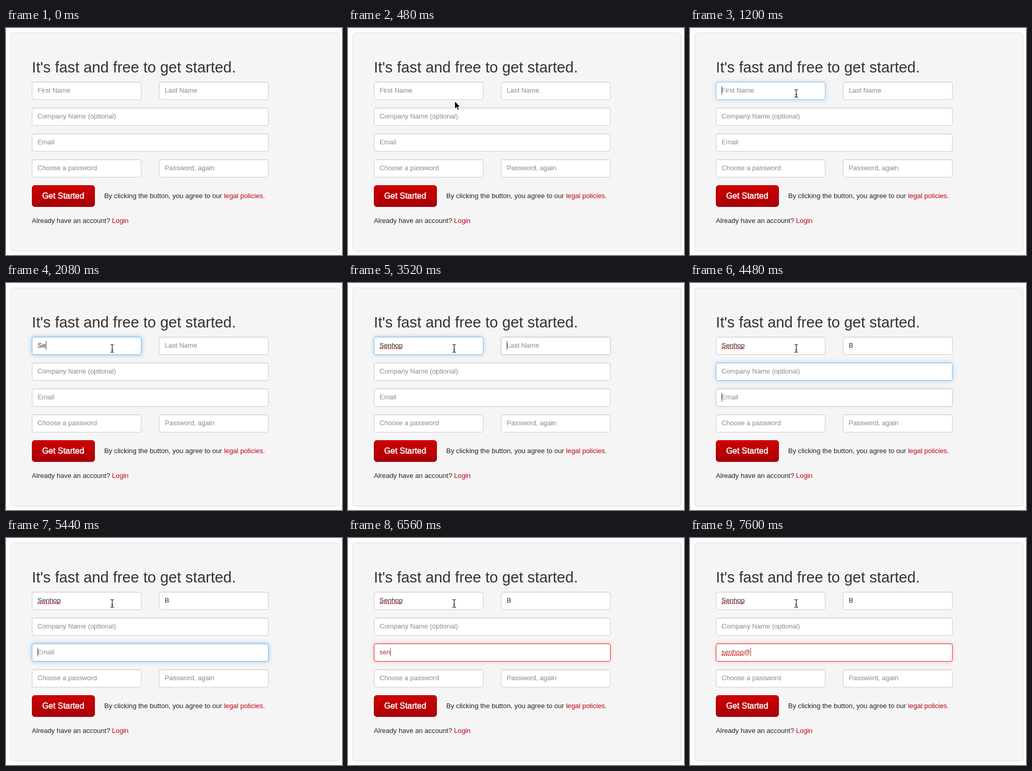
These frames come from a looping animation (650x439 px, 8 s). An HTML page:

```html
<!DOCTYPE html>
<html lang="en">
<head>
<meta charset="utf-8">
<title>Sign-up form</title>
<style>
html, body { margin: 0; width: 100%; height: 100%; overflow: hidden; background: #fff; }
body { position: relative; font-family: "Liberation Sans", Arial, sans-serif; }
svg { position: absolute; left: 0; top: 0; }
.field {
  position: absolute; box-sizing: border-box; height: 35px; padding-left: 10px;
  border: 1px solid #ccc; border-radius: 4px; background: #fff;
  font-size: 13px; line-height: 31px; white-space: pre; color: #444;
  -webkit-text-stroke: .2px;
}
.hint { color: #999; }
.typo {
  background: radial-gradient(circle at 1.5px 1.5px, #e8404a 1.1px, transparent 1.7px) 0 100% / 4px 3px repeat-x;
}
.caret {
  display: inline-block; width: 1px; height: 17px; margin-right: -1px;
  vertical-align: -4px; background: currentColor;
}
</style>
</head>
<body>
<svg width="650" height="439">
  <defs>
    <linearGradient id="red" x2="0" y2="1">
      <stop stop-color="#cf0000"/><stop offset="1" stop-color="#a6000a"/>
    </linearGradient>
  </defs>
  <rect x="9.5" y="9.5" width="635" height="422" rx="5" fill="#f5f5f5" stroke="#dcdcdc"/>
  <text x="50" y="86" font-size="29.3" fill="#333">It's fast and free to get started.</text>
  <rect x="50.5" y="304.5" width="121" height="41" rx="5" fill="url(#red)" stroke="#a80008"/>
  <g font-size="15.9" stroke-width=".5">
    <text x="70" y="329" fill="#800" opacity=".6">Get Started</text>
    <text x="70" y="330" fill="#fff" stroke="#fff">Get Started</text>
  </g>
  <g fill="#222">
    <text x="190" y="329" font-size="13.2">By clicking the button, you agree to our <tspan fill="#c00010">legal policies</tspan>.</text>
    <text x="50" y="377" font-size="13.1">Already have an account? <tspan fill="#c00010">Login</tspan></text>
  </g>
</svg>
<div id="form"></div>
<svg width="650" height="439">
  <g id="pointer">
    <g id="beam" fill="none" stroke-linecap="round">
      <path id="bar" d="M-3 -7.5Q0 -7.5 0 -5.5Q0 -7.5 3 -7.5M0 -5.5V6M-3 7.5Q0 7.5 0 5.5Q0 7.5 3 7.5M-1.5 2.5H1.5" stroke="#fff" stroke-width="3"/>
      <use href="#bar" style="display:none"/>
      <path d="M-3 -7.5Q0 -7.5 0 -5.5Q0 -7.5 3 -7.5M0 -5.5V6M-3 7.5Q0 7.5 0 5.5Q0 7.5 3 7.5M-1.5 2.5H1.5" stroke="#111" stroke-width="1.2"/>
    </g>
    <path id="arrow" d="M0 0V15L3.5 11.8L6 17.3L8.4 16.2L6 11H10.8Z" fill="#000" stroke="#fff"/>
  </g>
</svg>
<script>
const LOOP = 8000, STEP = 80, BLINK = 480;
const $ = id => document.getElementById(id);

// focus and blur: when the field becomes active and when it stops
const fields = [
  { x: 50, y: 104, w: 212, hint: 'First Name', focus: 1120, blur: 3520 },
  { x: 296, y: 104, w: 212, hint: 'Last Name', focus: 3520, blur: 4160 },
  { x: 50, y: 154, w: 458, hint: 'Company Name (optional)', focus: 4160, blur: 4480 },
  { x: 50, y: 204, w: 458, hint: 'Email', focus: 4480, blur: Infinity, invalid: 5680 },
  { x: 50, y: 254, w: 212, hint: 'Choose a password' },
  { x: 296, y: 254, w: 212, hint: 'Password, again' }
];

const keys = [];
function type(field, text, times) {
  times.forEach((time, i) => keys.push({ time, field, text: text.slice(0, i + 1) }));
}
type(0, 'Senhop', [1760, 2080, 2560, 2720, 2960, 3200]);
type(1, 'B', [3760]);
type(3, 'senhop@', [5680, 6320, 6560, 6800, 7040, 7360, 7600]);

for (const f of fields) {
  f.el = document.createElement('div');
  f.el.className = 'field';
  Object.assign(f.el.style, { left: f.x + 'px', top: f.y + 'px', width: f.w + 'px' });
  $('form').append(f.el);
}

const clamp = v => Math.max(0, Math.min(1, v));
const ramp = dt => dt < 0 ? 0 : clamp((dt + 40) / 200);
const mix = (a, b, k) => a.map((v, i) => v + (b[i] - v) * k);
const rgba = (c, alpha = 1) => `rgba(${c.map(Math.round)},${alpha})`;

const GREY = [204, 204, 204], BLUE = [117, 185, 240], RED = [236, 44, 44];
const BLUE_GLOW = [82, 168, 236], RED_GLOW = [243, 130, 126];

function drawField(f, index, t) {
  const typed = keys.filter(k => k.field === index && k.time <= t).pop();
  const text = typed ? typed.text : '';
  const active = t >= f.focus && t < f.blur;
  const level = f.focus ? ramp(t - f.focus) - ramp(t - f.blur) : 0;
  const bad = f.invalid ? ramp(t - f.invalid) : 0;

  const since = t - (typed ? typed.time : f.focus);
  const caret = active && Math.floor(since / BLINK) % 2 === 0 ? '<i class="caret"></i>' : '';
  const word = text.replace('@', '');
  const typo = word.length > 1 && (!active || word !== text);
  const html = text
    ? `<span class="${typo ? 'typo' : ''}">${word}</span>${text.slice(word.length)}${caret}`
    : `${caret}<span class="hint">${f.hint}</span>`;
  if (f.html !== html) f.el.innerHTML = f.html = html;

  const glow = rgba(mix(BLUE_GLOW, RED_GLOW, bad), .6 * level);
  f.el.style.color = bad ? '#b94a48' : '#444';
  f.el.style.borderColor = rgba(mix(GREY, mix(BLUE, RED, bad), level));
  f.el.style.boxShadow = `inset 0 1px 1px rgba(0,0,0,.075), 0 0 ${8 - 2 * bad}px ${glow}`;
}

function drawPointer(t) {
  const k = 1 - (1 - clamp(t / 640)) ** 2;
  const x = Math.round(228 - 23 * k), y = Math.round(372 - 246 * k);
  const overField = fields.some(f => x >= f.x && x < f.x + f.w && y >= f.y && y < f.y + 35);
  $('pointer').setAttribute('transform', `translate(${x + .5} ${y + .5})`);
  $('pointer').style.display = t ? '' : 'none';
  $('beam').style.display = overField ? '' : 'none';
  $('arrow').style.display = overField ? 'none' : '';
}

function frame() {
  const t = Math.floor(performance.now() % LOOP / STEP) * STEP;
  fields.forEach((f, i) => drawField(f, i, t));
  drawPointer(t);
  requestAnimationFrame(frame);
}
frame();
</script>
</body>
</html>
```
